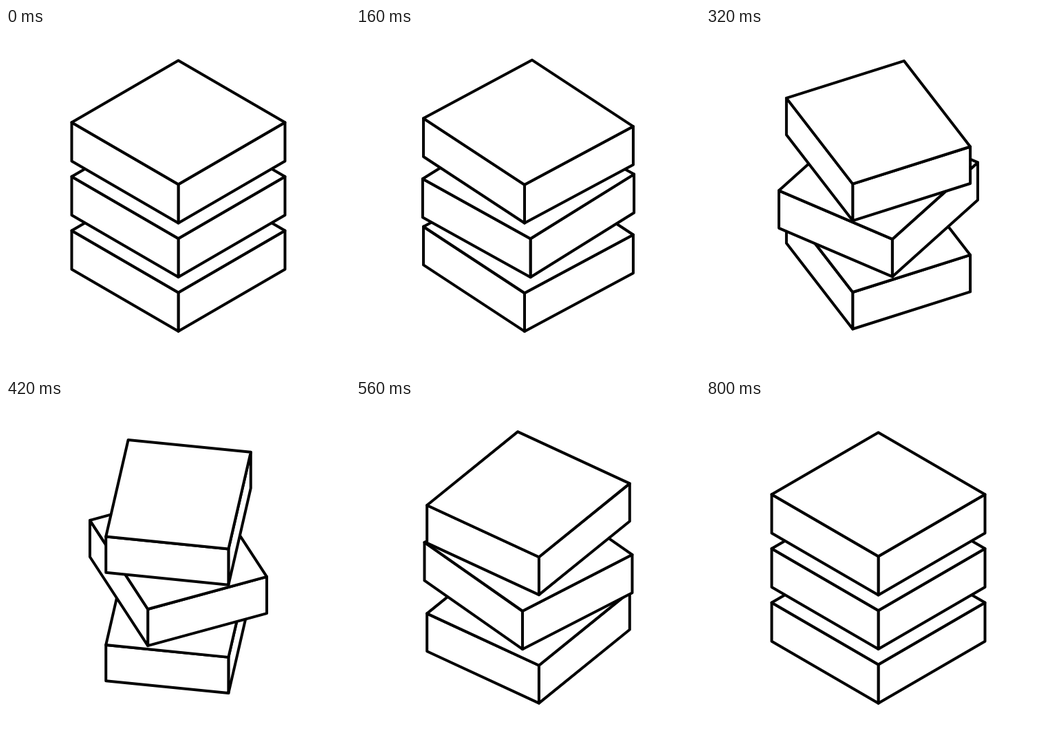
Write an HTML page with a canvas that moves like this. It is 500 px wide and 500 px high and loops after 0.84 s.

```html
<!DOCTYPE html>
<html lang="en">
<head>
<meta charset="utf-8">
<title>Twisting stack</title>
<style>
  html, body { margin: 0; width: 100%; height: 100%; overflow: hidden; background: #fff; }
  canvas { display: block; }
</style>
</head>
<body>
<canvas id="stage" width="500" height="500"></canvas>
<script>
const ctx = document.getElementById('stage').getContext('2d');
const LOOP = 840, MOVE = 800, STEP = 20;
const CENTER_X = 250.5, TOP_Y = 137.2, SPACING = 78.7;

const cubic = (a, b, c, d, s) => {
  const r = 1 - s;
  return a * r * r * r + 3 * b * r * r * s + 3 * c * r * s * s + d * s * s * s;
};

// Symmetric ease in and out; influence sets how abrupt the middle is.
function ease(t, influence) {
  let low = 0, high = 1;
  for (let i = 0; i < 30; i++) {
    const mid = (low + high) / 2;
    if (cubic(0, influence, 1 - influence, 1, mid) < t) low = mid;
    else high = mid;
  }
  return cubic(0, 0, 1, 1, low);
}

// Path of a corner from the side of the slab (s = 0) to its tip (s = 1).
const corner = s => ({
  x: cubic(155, 130, 57, 0, s),
  y: cubic(0, 62, 98, 90, s)
});

function face(points) {
  ctx.beginPath();
  points.forEach(([x, y]) => ctx.lineTo(x, y));
  ctx.closePath();
  ctx.fill();
  ctx.stroke();
}

function slab(cy, p, mirrored) {
  const a = corner(1 - p), b = corner(p);
  const depth = 56.2 - 16.5 * p * (1 - p);
  let offsets = [[a.x, -a.y], [b.x, b.y], [-a.x, a.y], [-b.x, -b.y]];
  if (mirrored) offsets = offsets.map(([x, y]) => [-x, y]).reverse();
  const top = offsets.map(([x, y]) => [CENTER_X + x, cy + y]);

  top.forEach(([x, y], i) => {
    const [nx, ny] = top[(i + 1) % 4];
    if (nx < x - 0.01) face([[x, y], [nx, ny], [nx, ny + depth], [x, y + depth]]);
  });
  face(top);
}

function draw(time) {
  const t = Math.min(MOVE, Math.floor(time / STEP) * STEP) / MOVE;
  const outer = ease(t, 0.745), inner = ease(t, 0.985);
  ctx.fillStyle = '#fff';
  ctx.fillRect(0, 0, 500, 500);
  ctx.strokeStyle = '#000';
  ctx.lineWidth = 4;
  ctx.lineJoin = 'round';
  slab(TOP_Y + 2 * SPACING, outer, false);
  slab(TOP_Y + SPACING, inner, true);
  slab(TOP_Y, outer, false);
}

const start = performance.now();
function tick() {
  draw((performance.now() - start) % LOOP);
  requestAnimationFrame(tick);
}
tick();
</script>
</body>
</html>
```
